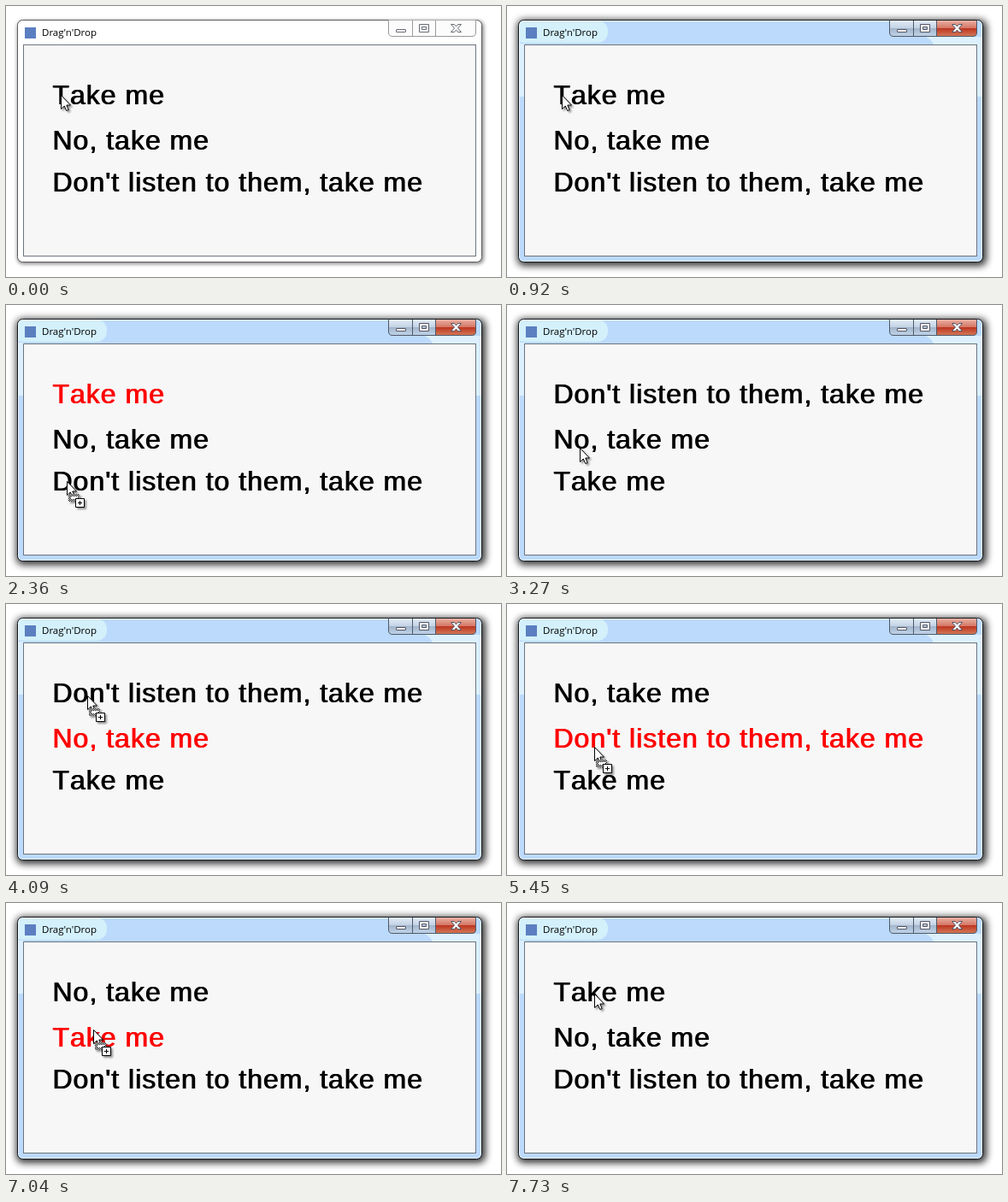
Recreate the animation shown at these times as an HTML page. Size 579 px wide and 317 px high, loop 8190 ms.

```html
<!DOCTYPE html>
<html lang="en">
<head>
<meta charset="utf-8">
<title>Drag'n'Drop</title>
<style>
  html, body { margin: 0; width: 100%; height: 100%; overflow: hidden; background: #fff; }
  svg { display: block; }
  .title { font: 11.5px "Open Sans", "Noto Sans", sans-serif; }
  /* Regular weight smeared one pixel to the right, as the system's simulated bold does. */
  .row {
    font: 32px "Liberation Sans", Arial, sans-serif;
    font-kerning: none; letter-spacing: 1px;
    fill: currentColor; filter: drop-shadow(1px 0 0 currentColor);
  }
  #cursor { filter: drop-shadow(2px 2px 1px rgba(0, 0, 0, .4)); }
</style>
</head>
<body>
<svg width="579" height="317" viewBox="0 0 579 317">
  <defs>
    <filter id="soft" x="-10%" y="-10%" width="120%" height="120%"><feGaussianBlur stdDeviation="2"/></filter>
    <filter id="deep" x="-10%" y="-10%" width="120%" height="120%"><feGaussianBlur stdDeviation="4"/></filter>
    <linearGradient id="steel" x2="0" y2="1">
      <stop offset="0" stop-color="#e2ecf7"/><stop offset=".48" stop-color="#c3d2e3"/>
      <stop offset=".5" stop-color="#a3b5ca"/><stop offset="1" stop-color="#c0d4ea"/>
    </linearGradient>
    <linearGradient id="red" x2="0" y2="1">
      <stop offset="0" stop-color="#eab1a4"/><stop offset=".48" stop-color="#d47664"/>
      <stop offset=".5" stop-color="#bd3520"/><stop offset="1" stop-color="#d47a58"/>
    </linearGradient>
    <pattern id="checker" width="2" height="2" patternUnits="userSpaceOnUse">
      <path d="M0 0h2v2h-2z" fill="#fff"/><path d="M0 0h1v1h-1zM1 1h1v1h-1z"/>
    </pattern>
    <clipPath id="frame"><rect x="13.5" y="16.5" width="543" height="283" rx="6"/></clipPath>
    <path id="buttons" d="M447.5 16.5V31q0 4.500 4.500 4.500H545q4.500 0 4.500-4.500V16.500M475.500 17V35M502.500 17V35"/>
    <g id="glyphs">
      <rect x="456.500" y="27.500" width="11" height="3" rx=".5"/>
      <path fill-rule="evenodd" d="M483.500 21.500h11v9h-11zM486.500 24.500h5v3h-5z"/>
      <path d="M520.500 21.500h4l2 2.500 2-2.500h4l-4 4.500 4 4.500h-4l-2-2.500-2 2.500h-4l4-4.500z"/>
    </g>
  </defs>

  <g id="inactive">
    <rect x="13" y="17" width="546" height="285" rx="7" opacity=".45" filter="url(#soft)"/>
    <rect x="13.500" y="16.500" width="543" height="283" rx="6" fill="#fff" stroke="#5c5c5c"/>
    <use href="#buttons" fill="#fcfcfc" stroke="#9a9a9a"/>
    <use href="#glyphs" fill="#fff" stroke="#686c74"/>
  </g>

  <g id="active">
    <rect x="12" y="16" width="549" height="288" rx="8" opacity=".8" filter="url(#deep)"/>
    <g clip-path="url(#frame)">
      <path d="M13 16H557V300H13z" fill="#bcdafc"/>
      <path d="M13 44H21V106H13zM549 44H557V106H549zM490 36H557V45H499Q496 39 490 36z" fill="#dcf0fd"/>
      <rect x="8" y="17" width="110" height="26" rx="12" fill="#d3f0fb"/>
    </g>
    <rect x="14.500" y="17.500" width="541" height="281" rx="5" fill="none" stroke="#fff" opacity=".7"/>
    <rect x="13.500" y="16.500" width="543" height="283" rx="6" fill="none" stroke="#15191f"/>
    <path d="M447.500 17V31q0 4.500 4.500 4.500H502.500V17z" fill="url(#steel)"/>
    <path d="M502.500 17V35.500H545q4.500 0 4.500-4.500V17z" fill="url(#red)"/>
    <use href="#buttons" fill="none" stroke="#4d5969"/>
    <use href="#glyphs" fill="#fff" stroke="#535666"/>
  </g>

  <rect x="20.500" y="45.500" width="529" height="247" fill="#f7f7f7" stroke="#6c7580"/>
  <rect x="22" y="25" width="13" height="13" fill="#5b7fc0"/>
  <text class="title" x="42" y="35">Drag'n'Drop</text>

  <text class="row" x="54" y="115"></text>
  <text class="row" x="54" y="168"></text>
  <text class="row" x="54" y="217"></text>

  <g id="cursor">
    <path d="M.5.5V16.500L4.300 13 6.800 18.500 9.200 17.500 6.800 12H11.500z" fill="#fff" stroke="#000"/>
    <g id="copy">
      <path d="M2 15H15V24H2z" fill="url(#checker)"/>
      <path d="M5 18H13V21H5z" fill="#f7f7f7"/>
      <path d="M10.500 20.500h10v10h-10z" fill="#fff" stroke="#000"/>
      <path d="M13 25.500h5M15.500 23v5" stroke="#000"/>
    </g>
  </g>
</svg>
<script>
  const LOOP = 8190, ACTIVATE = 920;
  const LABELS = ["Take me", "No, take me", "Don't listen to them, take me"];
  const HOME = [64, 104];

  // The pointer goes to `to` in equal steps, the first at `start`, the last at `end`.
  const moves = [
    { start: 1120, end: 1240, steps: 3, to: [58, 109] },
    { start: 1500, end: 1740, steps: 5, to: [66, 151] },
    { start: 2000, end: 2360, steps: 7, to: [71, 206] },
    { start: 3090, end: 3330, steps: 5, to: [89, 157] },
    { start: 3730, end: 4090, steps: 7, to: [95, 107] },
    { start: 4820, end: 5250, steps: 7, to: [102, 158] },
    { start: 5450, end: 5750, steps: 6, to: [102, 213] },
    { start: 6410, end: 6650, steps: 5, to: [102, 154] },
    { start: 6980, end: 7470, steps: 8, to: [102, 106] }
  ];

  // Dropping one row on another swaps their labels.
  const drags = [
    { start: 1120, drop: 2690, from: 0, onto: 2 },
    { start: 3730, drop: 4490, from: 1, onto: 0 },
    { start: 5450, drop: 6150, from: 1, onto: 2 },
    { start: 6980, drop: 7730, from: 1, onto: 0 }
  ];

  const byId = id => document.getElementById(id);
  const rows = [...document.querySelectorAll(".row")];
  const show = (id, visible) => { byId(id).style.display = visible ? "" : "none"; };

  function pointerAt(t) {
    let pos = HOME;
    for (const { start, end, steps, to } of moves) {
      if (t < start) break;
      const step = Math.floor((t - start) / (end - start) * (steps - 1) + 1e-6) + 1;
      const progress = Math.min(1, step / steps);
      pos = pos.map((from, axis) => Math.round(from + (to[axis] - from) * progress));
    }
    return pos;
  }

  function labelsAt(t) {
    const labels = [...LABELS];
    for (const { drop, from, onto } of drags) {
      if (t >= drop) [labels[from], labels[onto]] = [labels[onto], labels[from]];
    }
    return labels;
  }

  function render(t) {
    const drag = drags.find(d => t >= d.start && t < d.drop);
    const labels = labelsAt(t);
    rows.forEach((row, i) => {
      row.textContent = labels[i];
      row.style.color = drag && drag.from === i ? "#f00" : "#000";
    });
    show("active", t >= ACTIVATE);
    show("inactive", t < ACTIVATE);
    show("copy", drag);
    byId("cursor").setAttribute("transform", `translate(${pointerAt(t)})`);
  }

  const origin = performance.now();
  function tick() {
    render((performance.now() - origin) % LOOP);
    requestAnimationFrame(tick);
  }
  tick();
</script>
</body>
</html>
```
